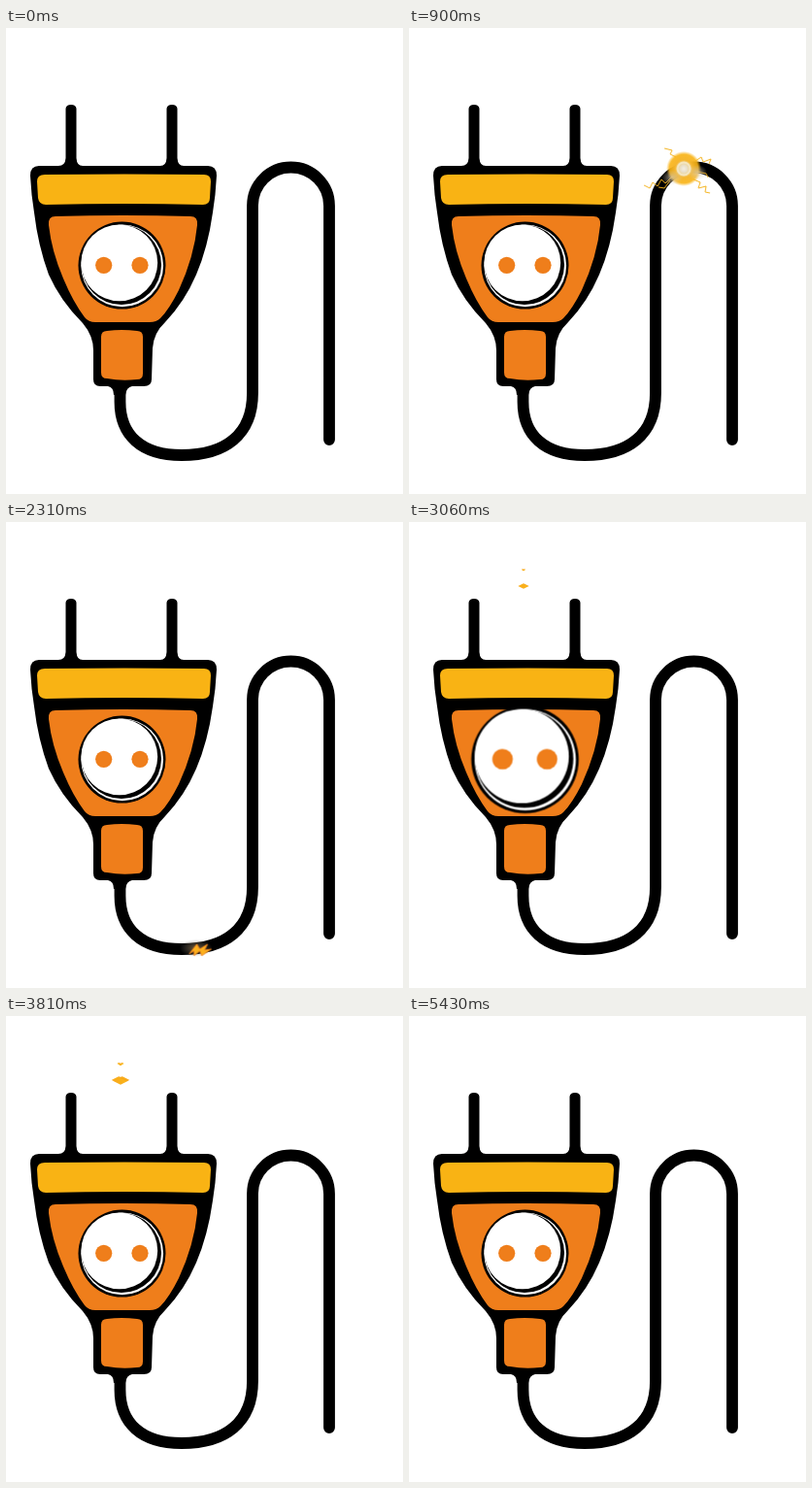
Recreate the animation shown at these times as an HTML page without scripts. Size 409 px wide and 480 px high, loop 5460 ms.

```html
<!DOCTYPE html>
<html lang="en">
<head>
<meta charset="utf-8">
<title>Power plug</title>
<style>
  html, body { margin: 0; width: 100%; height: 100%; overflow: hidden; background: #fff; }
  svg { display: block; width: 100%; height: 100%; }
  .loop { animation: 5.46s linear infinite; }

  #socket { transform-origin: 119.5px 244.5px; animation-name: beat; animation-timing-function: ease-in-out; }
  @keyframes beat {
    0%, 50.8%, 62.3%, 100% { transform: scale(1); }
    56.04% { transform: scale(1.23); }
  }

  #ball { animation-name: ball; }
  @keyframes ball {
    0% { transform: scale(0); opacity: 0; }
    1% { transform: scale(.2); opacity: 1; }
    9% { transform: scale(.75); }
    16.5%, 26% { transform: scale(1); }
    32% { transform: scale(.35); opacity: 1; }
    36%, 100% { transform: scale(.2); opacity: 0; }
  }
  #arcs { animation: flick .24s steps(1) infinite; }
  @keyframes flick {
    0%, 75% { transform: none; }
    25% { transform: rotate(40deg) scale(.9); }
    50% { transform: scale(-1, 1); }
  }
  #zap { animation-name: zap; }
  @keyframes zap {
    0%, 31% { transform: scale(.4); opacity: 0; }
    36% { transform: scale(.7); opacity: 1; }
    42.3%, 50% { transform: scale(1); opacity: 1; }
    54%, 100% { transform: scale(.4); opacity: 0; }
  }

  .reveal { animation-name: reveal; }
  .reveal.top { transform-origin: 118px 49px; }
  .reveal.low { transform-origin: 118px 66px; }
  @keyframes reveal {
    0%, 55.95% { transform: scale(0); }
    61%, 63.7% { transform: scale(32); }
    68.7%, 69.6% { transform: scale(0); }
    75%, 93.96% { transform: scale(32); }
    99.27%, 100% { transform: scale(0); }
  }
  #bolts { transform-origin: 118px 60px; animation-name: swell; }
  @keyframes swell {
    0%, 56%, 68.7%, 84.07%, 100% { transform: scale(1); }
    62% { transform: scale(1.03); }
    78.7% { transform: scale(1.05); }
  }
</style>
</head>
<body>
<svg viewBox="0 0 409 480">
  <defs>
    <path id="wire" d="M333 424V183A39.5 39.5 0 0 0 254 183V376C254 419 226 440 181 440C139 440 117.500 419 117.500 385V365"/>
    <radialGradient id="glow">
      <stop offset="0" stop-color="#f4efe4"/>
      <stop offset=".2" stop-color="#e9dfc8"/>
      <stop offset=".36" stop-color="#f0d48c"/>
      <stop offset=".5" stop-color="#f5b62e"/>
      <stop offset=".82" stop-color="#f9b314" stop-opacity=".9"/>
      <stop offset="1" stop-color="#f9b314" stop-opacity="0"/>
    </radialGradient>
    <radialGradient id="haze">
      <stop offset="0" stop-color="#8a6a3c" stop-opacity=".8"/>
      <stop offset="1" stop-color="#777" stop-opacity="0"/>
    </radialGradient>
    <radialGradient id="mist">
      <stop offset="0" stop-color="#d9cdb6" stop-opacity=".7"/>
      <stop offset="1" stop-color="#d9cdb6" stop-opacity="0"/>
    </radialGradient>
    <linearGradient id="amber" x2="1" y2="1">
      <stop offset="0" stop-color="#fcc21b"/>
      <stop offset=".5" stop-color="#f9a81b"/>
      <stop offset="1" stop-color="#fdc21c"/>
    </linearGradient>
    <path id="bolt" d="M4 44L33 61L19 67L34 75L26 83L39 98L11 87L20 79L5 67L18 61Z"/>
    <g id="side">
      <use href="#bolt"/>
      <use href="#bolt" x="105"/>
    </g>
    <use id="small" href="#bolt" transform="translate(67.5 42) rotate(-25) scale(-.78 .78) translate(-21.5 -71)"/>
    <clipPath id="burst">
      <path class="loop reveal top" d="M115 49L118 47L121 49L118 51Z"/>
      <path class="loop reveal low" d="M110 66L118 62L126 66L118 70Z"/>
    </clipPath>
  </defs>

  <use href="#wire" fill="none" stroke="#000" stroke-width="11.8" stroke-linecap="round"/>

  <!-- spark running along the wire -->
  <g>
    <animateMotion dur="5.46s" repeatCount="indefinite" calcMode="linear"
      keyTimes="0;.165;.313;.423;.54;1" keyPoints="0;.4;.665;.83;.98;.98">
      <mpath href="#wire"/>
    </animateMotion>
    <g id="ball" class="loop">
      <g id="arcs" fill="none" stroke="#f3b21c">
        <path d="M-12 8L-19 15L-23 11L-27 18L-32 14L-35 20L-41 17M-14 12L-20 20L-26 19M-8 -12L-14 -15L-12 -19L-20 -21"/>
        <path d="M12 -8L18 -12L20 -7L28 -10L26 -5M10 11L17 14L15 20L23 18L22 24L27 25M14 3L23 5L25 9"/>
      </g>
      <circle r="18" fill="url(#glow)"/>
      <ellipse cx="-12" cy="9" rx="11" ry="8" fill="url(#mist)"/>
      <ellipse cx="14" cy="4" rx="10" ry="8" fill="url(#mist)"/>
      <circle r="6.500" fill="none" stroke="#f7efdc" stroke-width="2" opacity=".7"/>
    </g>
    <g id="zap" class="loop">
      <ellipse cx="-3" rx="17" ry="9" fill="url(#haze)"/>
      <path d="M-10 6L-2 -4L1 1L9 -4L6 2L13 1L3 8L1 3L-5 8L-5 3Z" fill="#fbb01e" stroke="#f07f1e" stroke-width=".8"/>
    </g>
  </g>

  <!-- plug -->
  <path d="M61.500 83Q62 79 67 79T72.500 83V134Q73 142 79 142H159Q165 142 165.500 134V83Q166 79 171 79T176.500 83V134Q177 142 183 142H208Q217 142 217 152Q216 172 213 190Q208 226 196 254Q184 282 164 303Q152 314 151 330L150 362Q150 369 142 369H130Q124 370 123 378H111Q111 370 105 369H97Q90 369 90 362V332Q90 317 79 304Q56 281 44 254Q33 224 29 190Q26 172 25 152Q25 142 34 142H54Q61 142 61.500 134Z"/>
  <path d="M40 151Q122 150 204 151Q211 151 211 158L210 175Q210 182 203 182Q122 180 41 182Q34 182 33 175L32 158Q32 151 40 151Z" fill="#f9b314"/>
  <g fill="#ef7e1b">
    <path d="M51 194Q121 192 190 194Q198 194 197 203Q194 235 178 270Q168 290 159 299Q155 303 148 303H92Q85 303 81 298Q69 282 59 258Q47 230 44 203Q43 194 51 194Z"/>
    <path d="M104 312Q119 310 135 312Q141 312 141 318V356Q141 362 135 362Q119 364 104 361Q98 361 98 355V318Q98 312 104 312Z"/>
  </g>

  <g id="socket" class="loop">
    <circle cx="119.5" cy="244.6" r="45"/>
    <circle cx="119.7" cy="244.8" r="42.4" fill="#fff"/>
    <circle cx="119" cy="244" r="41"/>
    <circle cx="116.8" cy="241.8" r="39.4" fill="#fff"/>
    <g fill="#ef7e1b">
      <circle cx="100.7" cy="244.3" r="8.6"/>
      <circle cx="138" cy="244.3" r="8.6"/>
    </g>
  </g>

  <!-- lightning above the prongs -->
  <g clip-path="url(#burst)">
    <g id="bolts" class="loop" fill="url(#amber)" stroke="#f5a11a" stroke-width=".8">
      <use href="#side"/>
      <use href="#side" transform="matrix(-1 0 0 1 236 0)"/>
      <use href="#small"/>
      <use href="#small" x="104"/>
    </g>
  </g>
</svg>
</body>
</html>
```
